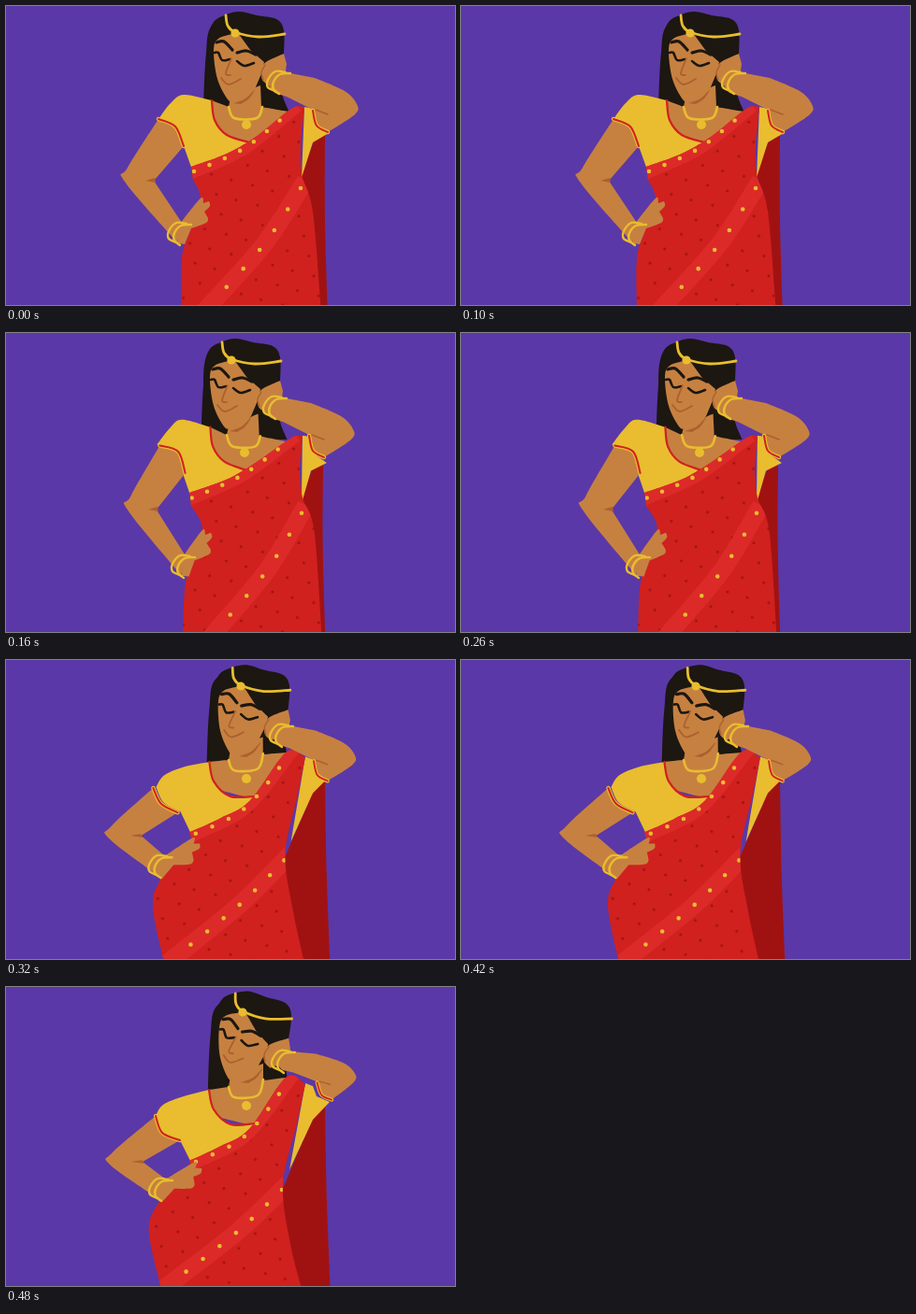
An HTML page that plays this animation: 480x320 px, repeating every 0.64 s.

```html
<!DOCTYPE html>
<html lang="en">
<head>
<meta charset="utf-8">
<title>Dancer in a red saree</title>
<style>
  html, body { margin: 0; width: 100%; height: 100%; overflow: hidden; background: #5b38a7; }
  svg { display: block; width: 100vw; height: 100vh; }
  path { fill: none; stroke-linecap: round; stroke-linejoin: round; }
  .pose { visibility: hidden; animation: show 640ms step-end infinite; }
  @keyframes show {
    0% { visibility: visible; }
    25%, 100% { visibility: hidden; }
  }
</style>
</head>
<body>
<svg id="stage" viewBox="0 0 480 320"></svg>
<script>
const RED = '#d0211f', BAND = '#dc2a29', DARK = '#a01212', GOLD = '#e9bd2f',
      SKIN = '#c68141', SHADE = '#ad602e', HAIR = '#1c1711';

// Smooth runs of points; "|" marks a sharp corner.
function curve(text) {
  let d = '';
  for (const run of text.split('|')) {
    const p = run.trim().split(' ').map(s => s.split(',').map(Number));
    d += (d ? 'L' : 'M') + p[0];
    for (let i = 0; i < p.length - 1; i++) {
      const a = p[i - 1] || p[i], b = p[i], c = p[i + 1], e = p[i + 2] || c;
      d += 'C' + [b[0] + (c[0] - a[0]) / 6, b[1] + (c[1] - a[1]) / 6,
                  c[0] - (e[0] - b[0]) / 6, c[1] - (e[1] - b[1]) / 6, ...c];
    }
  }
  return d;
}

// Blends the numbers of two strings of the same form.
function mix([a, b], k) {
  const to = b.match(/\d+/g);
  let i = 0;
  return a.replace(/\d+/g, v => (+v + (to[i++] - v) * k).toFixed(1));
}

const fill = (pts, color) => `<path d="${curve(pts)}Z" style="fill:${color}"/>`;
const line = (pts, color, w, extra = '') =>
  `<path d="${curve(pts)}" stroke="${color}" stroke-width="${w}" ${extra}/>`;
const dot = (x, y, r, color) => `<circle cx="${x}" cy="${y}" r="${r}" fill="${color}"/>`;
const group = (transform, body) => `<g transform="${transform}">${body}</g>`;
const move = (x, y, body) => group(`translate(${x} ${y})`, body);
const trim = pts => line(pts, GOLD, 4.4) + line(pts, RED, 2);
const border = (pts, width, gaps) =>
  line(pts, BAND, width, 'style="stroke-linecap:square"') +
  line(pts, GOLD, 4.6, `pathLength="${gaps - .01}" stroke-dasharray="0 1"`);

// Parts that keep their shape and only move or turn
const tail = fill('211,114 212,80 214,50 218,24 236,9|270,20 280,60|294,80 296,97 303,114', HAIR);

const head =
  fill('215,58 216,34 222,17 236,9 250,6 268,10 289,14 297,26 297,52|270,80', HAIR) +
  fill('246,29 227,35 222,48 226,78 237,100 244,102 256,98 266,89|274,70 276,60|262,48 248,29', SKIN) +
  fill('297,51 278,60 273,69 274,79 281,85|298,76|300,62', SKIN) +
  line('277,63 273,71 275,79', SHADE, 1.4) +
  line('225,39 233,38 242,47', HAIR, 3.2) +
  line('247,50 257,48 267,52', HAIR, 3.2) +
  line('223,50 227,50 231,58 239,57', HAIR, 2.6) +
  line('247,59 255,64 265,61', HAIR, 2.6) +
  line('241,56 235,72 240,74', SHADE, 1.8) +
  line('230,77 238,84 251,78', SHADE, 1.8) +
  line('235,10 237,21 245,28 270,33 298,30', GOLD, 2.8) +
  dot(245, 29, 4.6, GOLD);

const raised =
  fill('280,84 288,72 299,71|330,77 362,91 375,105 373,116 344,135|332,128 328,111|300,97 287,93', SKIN) +
  line('331,111 344,116', SHADE, 1.6) +
  trim('328,112 332,128 344,135');

const hand = fill('186,233 196,220 209,205 211,211|217,209 218,214 212,220|216,227 214,232 198,238|191,255 183,254', SKIN);

const bangles = line('299,71 288,70 280,79 280,87 288,91', GOLD, 2.4) +
                line('304,72 293,73 286,81 286,89 292,94', GOLD, 2.4);

// Parts that bend: standing tall, then swayed to the left
const body = {
  pallu: ['341,138 341,230 344,330|312,330|314,180 330,143',
          '341,124 343,230 347,330|308,330|290,230 330,135'],
  side: ['319,108 329,110|333,128 345,136|328,146 316,184',
         '320,103 328,106|332,117 346,123|328,142 303,196'],
  chest: ['220,101 238,108|240,98 272,85|273,108 302,113|265,150 222,135',
          '217,110 238,107|240,95 275,82|275,100 299,97|270,150 222,138'],
  shoulder: ['163,121 176,104 190,95 220,101', '160,138 168,126 190,117 217,110'],
  neck: ['220,101 223,122 236,138 260,146', '217,110 222,131 240,147 266,146'],
  waist: ['262,160 200,178', '266,160 198,188'],
  cuff: ['190,150 181,129 163,121', '186,164 167,156 160,138'],
  lace: ['238,108 244,120 268,120 274,108', '238,107 244,118 269,116 275,99'],
  saree: ['198,172 236,158 267,140 305,110 319,108|315,145 316,180 328,220 337,330|188,330 188,270 197,240 208,207 200,186',
          '196,186 228,171 260,152 299,97 320,104|310,150 296,212 304,275 318,330|168,330 153,265 160,236 184,210 200,198'],
  rim: ['201,177 255,152 306,111', '203,187 256,159 303,99'],
  fold: ['315,195 276,255 218,320', '295,217 246,263 175,318'],
  arm: ['163,121 130,173 127,188 183,253|188,232|158,187', '160,138 114,177 111,190 162,226|171,206|146,187'],
  crease: ['149,187 159,184|160,189', '134,187 145,185|148,189'],
  wrist: ['185,244', '165,217']
};

// sway: 0 tall, 1 swayed; head: x, y, tilt; hold: raised wrist x, y, turn, size
const poses = [
  { sway: 0,    shift: [0, 0],  reach: [0, 0],  head: [0, 0, 0],     hold: [299, 71, 0, 1] },
  { sway: -.15, shift: [-2, 1], reach: [1, 2],  head: [-4, 0, 0],    hold: [295, 69, 0, 1] },
  { sway: .88,  shift: [0, 0],  reach: [-3, 1], head: [6, -1, 3.5],  hold: [302, 70, 0, .93] },
  { sway: 1,    shift: [0, 0],  reach: [0, 0],  head: [8, -2, 6.5],  hold: [304, 69, -5.5, .87] }
];

function draw({ sway, shift, reach, head: [hx, hy, tilt], hold: [x, y, turn, size] }, i) {
  const b = {};
  for (const name in body) b[name] = mix(body[name], sway);
  const [wx, wy] = b.wrist.split(',').map(Number);

  const torso =
    fill(b.chest, SKIN) +
    move(hx - shift[0], hy, fill('243,104 256,99 266,89 260,99 251,105', SHADE)) +
    fill([b.shoulder, b.neck, b.waist, b.cuff].join('|'), GOLD) +
    line(b.neck, RED, 2.2) +
    line(b.lace, GOLD, 2.6) + dot(257, 127, 5, GOLD) +
    fill(b.saree, RED) +
    `<g clip-path="url(#cut${i})">
      <rect width="480" height="330" fill="url(#spots${i})"/>
      ${border(b.fold, 19, Math.round(6 + sway))}${border(b.rim, 14, 7)}
    </g>`;

  const limb =
    fill(b.cuff + '|' + b.arm, SKIN) + fill(b.crease, SHADE) + trim(b.cuff) +
    group(`translate(${wx} ${wy}) rotate(${20 * sway}) scale(${1 + .05 * sway}) translate(-185 -244)`, hand) +
    move(wx - 291, wy - 82, bangles);

  return `<g class="pose" style="animation-delay:${i * 160 - 640}ms">
    <clipPath id="cut${i}"><path d="${curve(b.saree)}Z"/></clipPath>
    <pattern id="spots${i}" width="40" height="22" patternUnits="userSpaceOnUse"
      patternTransform="translate(${4 - 13 * sway} ${2 + 8 * sway}) rotate(-14)">
      ${dot(6, 5, 1.5, DARK)}${dot(25, 16, 1.5, DARK)}
    </pattern>
    ${move(...shift, fill(b.pallu, DARK))}
    ${move(hx * .6, 0, tail)}
    ${move(...shift, fill(b.side, GOLD) + torso)}
    ${move(...reach, limb)}
    ${group(`translate(${hx} ${hy}) rotate(${tilt} 245 29)`, head)}
    ${group(`translate(${x} ${y}) rotate(${turn}) scale(${size}) translate(-299 -71)`, raised)}
    ${move(x - 299, y - 71, bangles)}
  </g>`;
}

document.getElementById('stage').innerHTML = poses.map(draw).join('');
</script>
</body>
</html>
```
